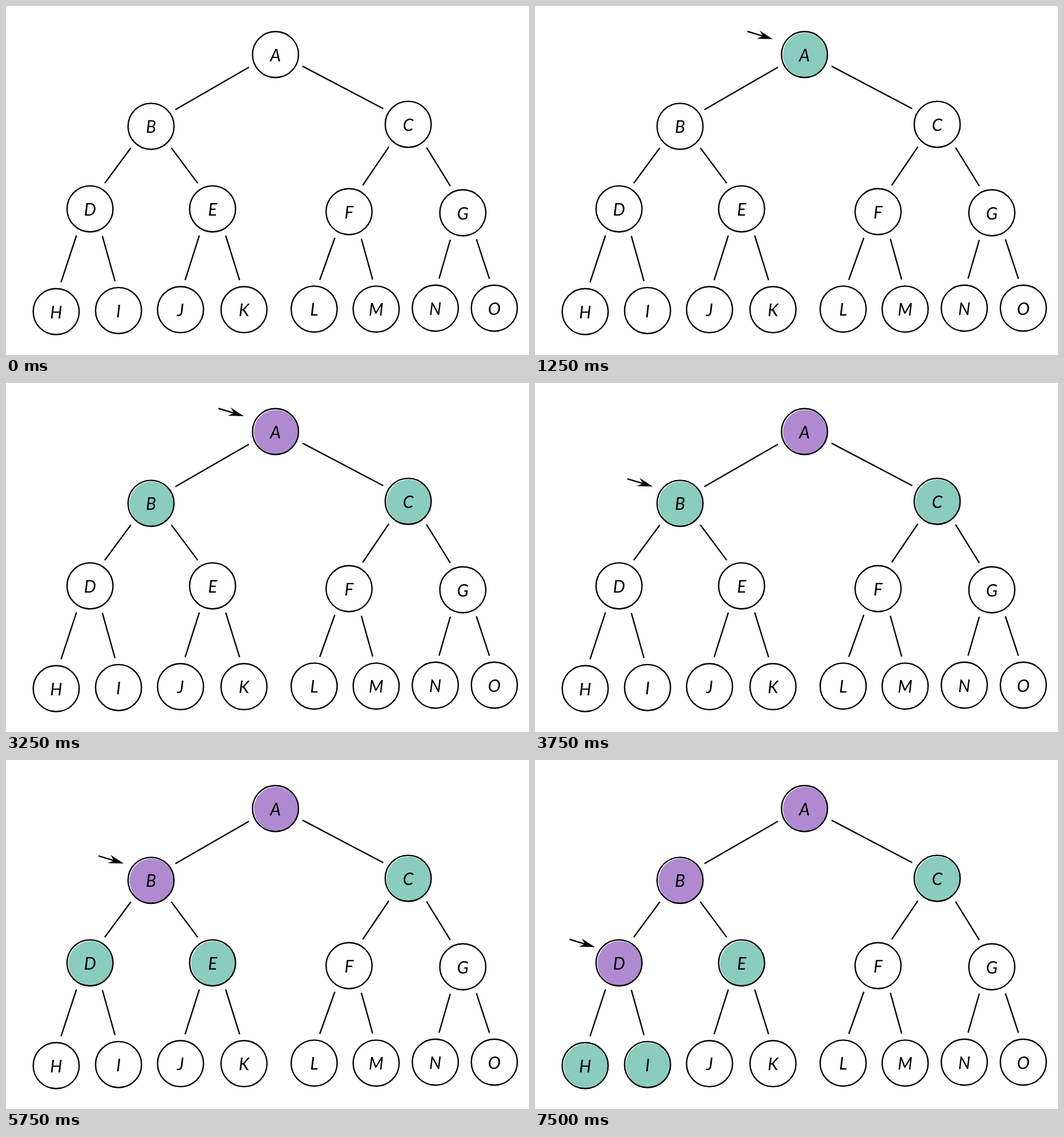
An HTML page for the animation above (8 s loop, 917 by 611 pixels).

```html
<!DOCTYPE html>
<html lang="en">
<head>
<meta charset="utf-8">
<title>Tree search</title>
<style>
  html, body { margin: 0; width: 100%; height: 100%; overflow: hidden; background: #fff; }
  svg { display: block; width: 100%; height: 100%; }
  .stroke { fill: none; stroke: #000; stroke-width: 2.4; }
  text { font: italic 30px Lato, "Open Sans", sans-serif; text-anchor: middle; }
</style>
</head>
<body>
<svg viewBox="0 0 917 611"></svg>
<script>
const svg = document.querySelector('svg');
const STEP = 1250, LOOP = 8000;
const TEAL = '#8accbd', PURPLE = '#b08ad1';
const RADIUS = 40.3, EDGE_TRIM = 51.5;

// Circle centres in heap order, one row per level
const nodes = [
  [472.5, 85],
  [254.3, 210.7], [705.2, 207.2],
  [147.3, 355.2], [362.2, 355.2], [601.5, 360], [801, 362],
  [88, 535], [197.3, 533.2], [306, 531.6], [417.3, 531.6],
  [540.3, 530.7], [649, 530.7], [752.7, 529], [856.2, 529]
];
const visited = [0, 1, 3];
const arrowAt = [[372, 44], [161.5, 167.3], [60, 313.5]];
const parentOf = i => (i - 1) >> 1;

function add(tag, attrs, parent = svg) {
  const el = document.createElementNS('http://www.w3.org/2000/svg', tag);
  for (const key in attrs) el.setAttribute(key, attrs[key]);
  return parent.appendChild(el);
}

// Edges stop short of both circles and sit a little outside the centre line
function addEdge(i) {
  const [px, py] = nodes[parentOf(i)], [x, y] = nodes[i];
  const angle = Math.atan2(y - py, x - px) * 180 / Math.PI;
  const depth = Math.floor(Math.log2(i + 1));
  const shift = (i % 2 ? 1 : -1) * (2 + 2 * depth);
  const end = Math.hypot(x - px, y - py) - EDGE_TRIM;
  add('path', {
    class: 'stroke', d: `M${EDGE_TRIM} ${shift}H${end}`,
    transform: `translate(${px} ${py}) rotate(${angle})`
  });
}

const fills = nodes.map(([cx, cy], i) => {
  if (i) addEdge(i);
  const fill = add('circle', { cx: cx + 0.9, cy: cy + 0.7, r: RADIUS - 1.5 });
  add('circle', { class: 'stroke', cx, cy, r: RADIUS });
  add('text', { x: cx, y: cy + 11.7 }).textContent = String.fromCharCode(65 + i);
  return fill;
});

const arrow = add('g', {});
add('path', { class: 'stroke', d: 'M0.5 0.5L30 9.3' }, arrow);
add('path', { d: 'M45 14L22 -1L27.5 8.6L17 13.2Z' }, arrow);

function draw(now) {
  const step = Math.floor(now % LOOP / STEP);
  const done = visited.slice(0, step >> 1);
  fills.forEach((fill, i) => {
    const queued = i ? done.includes(parentOf(i)) : step > 0;
    fill.setAttribute('fill', done.includes(i) ? PURPLE : queued ? TEAL : 'none');
  });
  arrow.setAttribute('visibility', step ? 'visible' : 'hidden');
  if (step) arrow.setAttribute('transform', `translate(${arrowAt[(step - 1) >> 1]})`);
}

function tick() {
  draw(performance.now());
  requestAnimationFrame(tick);
}
tick();
</script>
</body>
</html>
```
